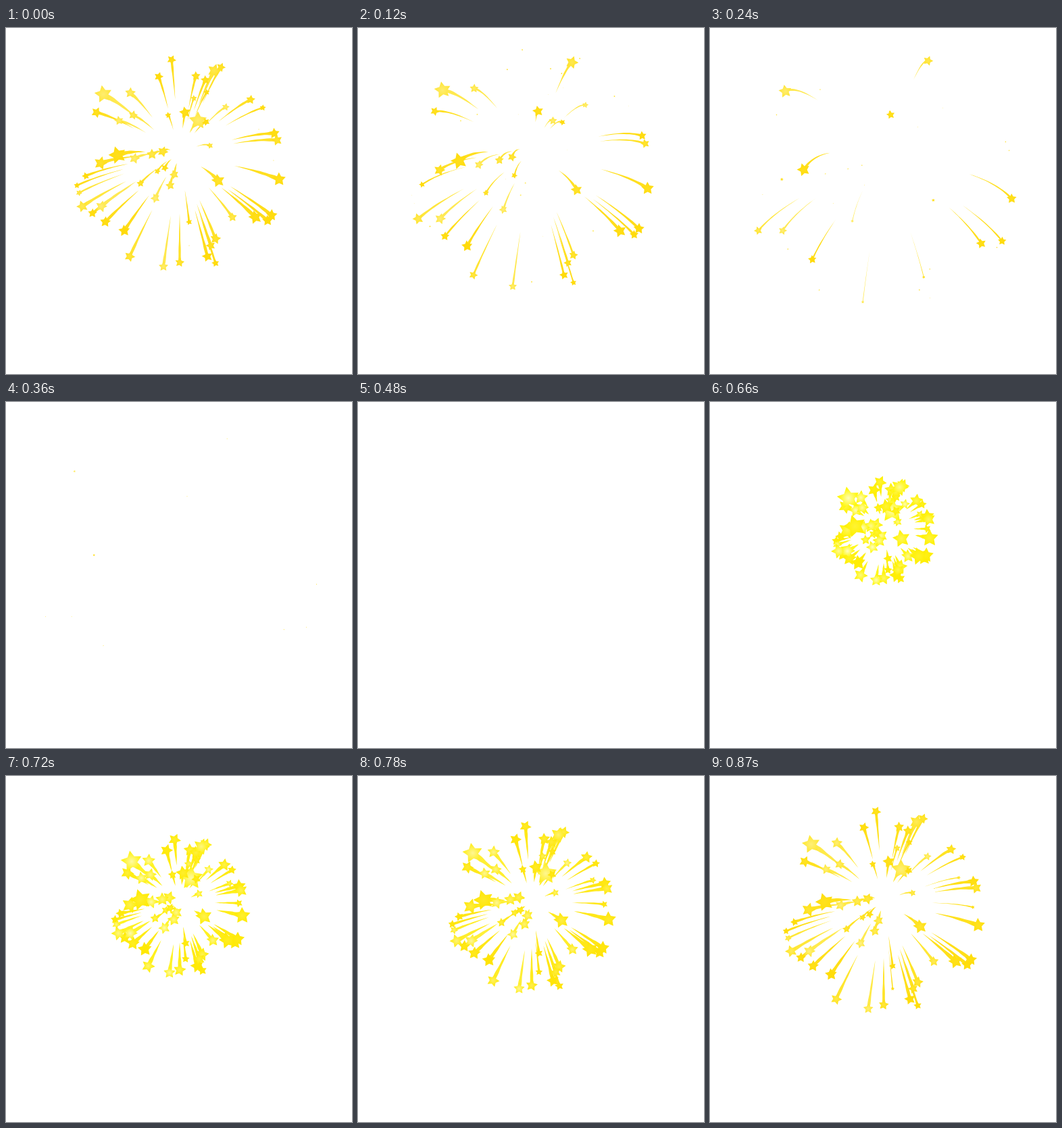
These frames come from a looping animation (512 px wide and 512 px high, 900 ms). An HTML page with a canvas:

```html
<!DOCTYPE html>
<html lang="en">
<head>
<meta charset="utf-8">
<title>Star burst</title>
<style>
  html, body { margin: 0; width: 100%; height: 100%; overflow: hidden; background: #fff; }
  canvas { display: block; width: 512px; height: 512px; }
</style>
</head>
<body>
<canvas id="stage" width="512" height="512"></canvas>
<script>
const ctx = document.getElementById('stage').getContext('2d');
const LOOP = 900, STEP = 30, SHIFT = 300;
const CX = 257, CY = 189;

// Each group: life in ms, radius, then x, y of every star 300 ms into the burst
const groups = [
  [308, 5, 374, 150, 396, 196, 271, 322],
  [425, 5.5, 297, 95, 278, 104, 380, 118, 302, 174, 240, 129, 105, 233, 108, 244, 224, 212, 271, 287],
  [432, 8, 245, 47, 226, 72, 281, 71, 318, 58, 295, 77, 362, 106, 167, 137, 188, 129,
    128, 274, 257, 347, 335, 280, 249, 217, 243, 233],
  [460, 15, 284, 137],
  [548, 6, 296, 139, 118, 219, 199, 230, 235, 207, 325, 117, 310, 348],
  [552, 8.5, 397, 156, 401, 166, 184, 96, 134, 125, 232, 183, 216, 187, 190, 193,
    147, 287, 183, 338, 387, 285, 298, 338, 310, 312],
  [565, 10.5, 140, 200, 314, 226],
  [575, 7.5, 233, 353, 303, 322, 221, 252],
  [668, 9, 265, 125, 113, 264, 141, 264, 393, 277, 175, 300],
  [668, 10.5, 308, 63, 404, 224, 369, 280],
  [675, 13.5, 144, 98, 165, 188]
];

// Distance travelled under drag, t in seconds
const reach = t => 1.2475 - 1.043 * Math.exp(-2.6 * t);
const random = n => {
  const v = Math.sin(n * 12.9898) * 43758.5453;
  return v - Math.floor(v);
};

const stars = [];
for (const [life, r, ...points] of groups) {
  for (let i = 0; i < points.length; i += 2) {
    const n = stars.length + 1, f = reach(0.3);
    const rise = (points[i + 1] - CY) / f;
    const gravity = 125 - 0.45 * Math.max(0, rise);
    stars.push({
      life: life / 1000, r, gravity,
      dx: (points[i] - CX) / f,
      dy: rise - gravity * 0.09 / f,
      angle: (random(n) - 0.5) * 0.9,
      shade: random(n + 70)
    });
  }
}

function place(s, t) {
  const f = reach(t);
  return [CX + s.dx * f, CY + s.dy * f + s.gravity * t * t];
}

function tone(s, t, lift) {
  const age = Math.min(1, t / 0.3);
  const hue = 60 - age * (7.5 + 1.5 * (1 - s.shade)) - 3 * (1 - s.shade) * (1 - age);
  const light = 50 + 12 * s.shade * s.shade * age + 2 * age + lift;
  return `hsl(${hue}, 100%, ${Math.min(97, light)}%)`;
}

const size = (s, t) => Math.max(0, 1 - Math.pow(t / s.life, 6));

function drawTrail(s, t) {
  const scale = size(s, t);
  if (scale < 0.25) return;
  const start = 0.25 * t + 0.56 * t * t * t;
  const half = s.r * scale * (0.9 - t) / 2;
  const left = [], right = [], count = 14;
  for (let i = 0; i <= count; i++) {
    const u = i / count, at = start + (t - start) * u;
    const [x, y] = place(s, at), [nx, ny] = place(s, at + 0.005);
    const len = Math.hypot(nx - x, ny - y) || 1;
    const w = half * Math.pow(u, 0.85) * (1 + 0.1 * Math.sin(u * 17 + s.angle * 20)) / len;
    left.push([x - (ny - y) * w, y + (nx - x) * w]);
    right.unshift([x + (ny - y) * w, y - (nx - x) * w]);
  }
  ctx.beginPath();
  for (const p of left.concat(right)) ctx.lineTo(...p);
  ctx.fillStyle = tone(s, t, 3);
  ctx.fill();
}

function drawStar(s, t) {
  const scale = size(s, t);
  if (!scale) return;
  const [x, y] = place(s, t);
  const r = s.r * scale * (1 + 0.35 * Math.max(0, 1 - t / 0.3));
  ctx.beginPath();
  for (let i = 0; i < 10; i++) {
    const a = s.angle + (i / 5 - 0.5) * Math.PI, d = i % 2 ? r * 0.52 : r;
    ctx.lineTo(x + Math.cos(a) * d, y + Math.sin(a) * d);
  }
  ctx.closePath();
  const young = Math.max(0, 1 - t / 0.3);
  const glow = ctx.createRadialGradient(x, y, 0, x, y, r * 0.8);
  glow.addColorStop(0, tone(s, t, s.shade * (10 + 32 * young)));
  glow.addColorStop(1, tone(s, t, 0));
  ctx.fillStyle = glow;
  ctx.fill();
}

function frame(now) {
  const ms = Math.floor(now % LOOP / STEP) * STEP;
  const t = (ms + SHIFT) % LOOP / 1000;
  const alive = stars.filter(s => t < s.life);
  ctx.clearRect(0, 0, 512, 512);
  for (const s of alive) drawTrail(s, t);
  for (const s of alive) drawStar(s, t);
}

const begin = performance.now();
function tick() {
  frame(performance.now() - begin);
  requestAnimationFrame(tick);
}
tick();
</script>
</body>
</html>
```
